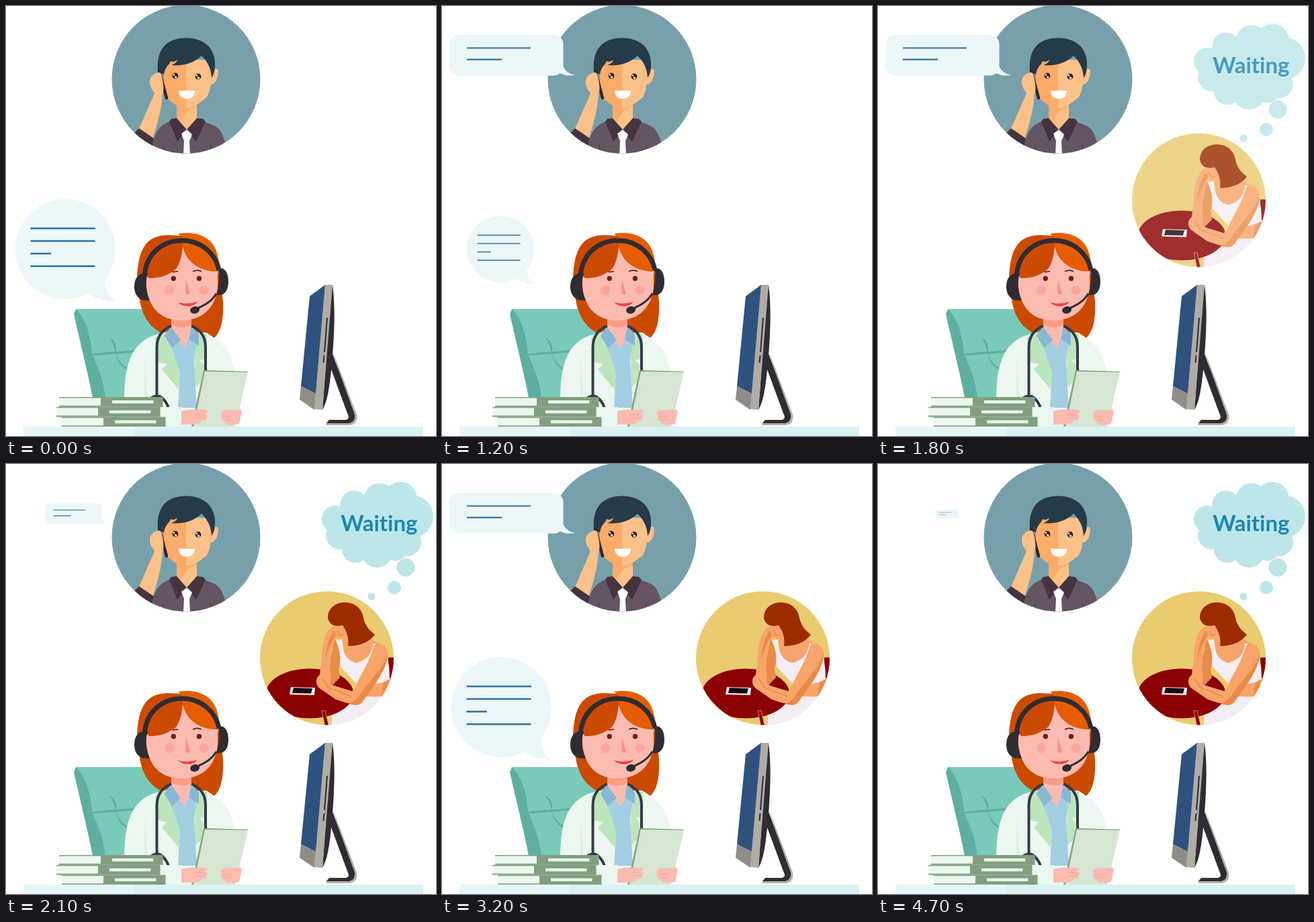
An HTML page for the animation above (4800 ms loop, 640 px wide and 640 px high).

```html
<!DOCTYPE html>
<html lang="en">
<head>
<meta charset="utf-8">
<title>Waiting on a call</title>
<style>
html, body { margin: 0; width: 100%; height: 100%; overflow: hidden; background: #fff; }
svg { display: block; width: 100%; height: 100%; }
text { font: 700 33px Lato, "Open Sans", sans-serif; font-variant-ligatures: none; }
.line { fill: none; stroke: #31719f; }
.dark { fill: #302c33; }
.wire { fill: none; stroke: #302c33; }
.coat { fill: #ebf7ef; }
.pink { fill: #fbbbb1; }
.cover { fill: #819f7f; }
.bubble { fill: #ebf7f9; }
</style>
</head>
<body>
<svg viewBox="0 0 640 640">
<defs>
  <clipPath id="callerClip"><circle cx="268" cy="109" r="110.5"/></clipPath>
  <clipPath id="patientClip"><circle cx="477.5" cy="289" r="99.5"/></clipPath>
</defs>

<g id="caller" clip-path="url(#callerClip)">
  <path fill="#78a0ab" d="M150-10H390V230H150Z"/>
  <path fill="#655462" d="M216 222C219 192 224 180 243 172L256 168H284L305 176C319 181 322 188 328 210V222Z"/>
  <path fill="#fbc188" d="M254 140H284V169L269 185L254 169Z"/>
  <path fill="#fdab68" d="M254 140H284V150C272 152 266 160 259 174L254 169Z"/>
  <path fill="#45343f" d="M246 168L254 167L269 184L255 202L243 172ZM284 167L293 168L297 172L283 202L269 184Z"/>
  <path fill="#fff" d="M269 184L261 190L265 201L264 222H274L273 201L277 191Z"/>
  <path fill="none" stroke="#45343f" stroke-width=".8" d="M233 206L235 216M305 206L303 216"/>
  <path fill="#fbc188" d="M306 97C309 93 316 92 316 97C316 108 311 117 304 117Z"/>
  <path fill="#fbc188" d="M235 80H306V107L303 126L299 136L284 147C276 153 262 153 254 148L240 138L235 122Z"/>
  <path fill="#fdab68" d="M235 80H268V152C261 152 257 150 254 148L240 138L235 122Z"/>
  <path fill="#263b4a" d="M226 98C224 72 232 48 268 47.5C300 48 312 68 311 88C311 97 309 103 306 107C305 92 300 83 291 74C281 84 265 90 246 88C251 86 254 84 255 80C249 85 246 82 245 82L243 86C238 91 236 96 235 102Z"/>
  <g fill="#2a1d15"><circle cx="252" cy="104" r="4.4"/><circle cx="286" cy="105" r="4.4"/></g>
  <g fill="#fff"><circle cx="250" cy="102.5" r="1.3"/><circle cx="252.5" cy="106" r="1.8"/><circle cx="284" cy="103.5" r="1.3"/><circle cx="286.5" cy="107" r="1.8"/>
  <path d="M257 126H281C281 134 276 138 269 138C262 138 257 134 257 126Z"/></g>
  <path fill="none" stroke="#33262f" stroke-width="4.5" stroke-linecap="round" d="M228 96L239 137"/>
  <path fill="#fbc188" d="M229 99C220 99 213 106 214 114C214 121 219 126 221 130L197 185L218 198C225 178 232 152 233 131C236 125 234 112 231 101Z"/>
  <path fill="#45343f" d="M198 182L220 197L217 210L188 192Z"/>
</g>

<g id="patient" clip-path="url(#patientClip)">
  <path fill="#ebcb70" d="M370 180H590V400H370Z"/>
  <path fill="#8b0000" d="M569 288H580V324H568Z"/>
  <path fill="#f4edf3" d="M484 400L486 368L532 346H580V400Z"/>
  <path fill="#f9a46a" d="M499 246H520L553 266L545 300L505 295ZM530 326L574 318V343C560 348 546 346 530 345Z"/>
  <path fill="#e98b47" d="M562 326L574 319V337L558 345Z"/>
  <path fill="#f4edf3" d="M490 263L500 261C500 281 508 294 522 296C536 292 546 282 546 267L557 268C566 278 571 292 571 320C560 326 551 328 543 328H523L498 302Z"/>
  <ellipse cx="452" cy="341.5" rx="65" ry="37" fill="#8b0000"/>
  <path fill="#8b0000" stroke="#f3b9a4" stroke-width=".7" d="M470 367H475L481 392H475Z"/>
  <path fill="#f4edf3" d="M424 332L460 333L459 344L422 343Z"/>
  <path fill="#150a12" d="M428 333L456 334L454 341.5L426 341Z"/>
  <path fill="#e98b47" d="M489 260C497 273 500 291 495 305L497 318L480 335L483 290Z"/>
  <path fill="#f9a46a" d="M484 243C475 252 470 268 470 290C467 310 466 320 468 330L482 334C486 317 481 307 483 290C484 273 488 265 491 258C500 264 507 258 509 250L501 238Z"/>
  <path fill="#e98b47" d="M488 248C481 257 477 271 475 290C480 276 484 264 491 255Z"/>
  <path fill="none" stroke="#e98b47" stroke-width="1.5" d="M493 248L497 255L503 254"/>
  <path fill="#9c2c00" d="M479 229C479 213 492 206 505 206C524 207 531 219 533 233C536 243 543 249 549 254C540 266 525 271 509 271C511 258 506 247 501 240C492 242 482 242 479 229Z"/>
  <path fill="#f9a46a" d="M553 266C564 268 571 278 567 289C561 309 545 331 531 350C525 361 511 358 490 350L467 334C460 328 460 318 468 313C474 322 482 328 492 331L515 338C520 334 521 330 523 325C530 309 542 293 548 270Z"/>
  <path fill="#e98b47" d="M568 282C569 303 548 330 532 352C526 361 519 359 510 357C522 353 527 343 535 332C550 313 562 300 568 282Z"/>
  <path fill="none" stroke="#e98b47" stroke-width="1.5" d="M471 319L480 333L514 346"/>
</g>

<g id="cloud" fill="#bde6e9">
  <ellipse cx="553" cy="88" rx="60" ry="44"/>
  <g id="puffs"></g>
  <text x="555.3" y="100" text-anchor="middle" fill="#1b86b3">Waiting</text>
</g>

<g id="chair">
  <path fill="#79cabb" d="M104 451H238V590H130Z"/>
  <path fill="#5eafa1" d="M104 451L101 459L130 584H148C146 558 135 534 128 518C126 490 119 466 104 451ZM128 518C150 514 175 515 205 510V514C180 516 155 519 128 520ZM153 493C163 498 166 506 163 516C161 506 159 500 153 493ZM163 516C169 532 177 539 190 542C177 544 167 535 163 516Z"/>
</g>

<g id="doctor">
  <path fill="#cc4a00" d="M195 408C196 358 211 341 242 341L262 342C300 342 321 390 323 440C324 464 321 484 310 494L298 486H246L234 488C212 478 203 460 199 438Z"/>
  <path class="coat" d="M236 486C198 493 177 514 176 580V626H341L340 545C335 508 315 494 291 486Z"/>
  <path fill="#dcefe2" d="M207 520L210 582H206Z"/>
  <path fill="#bde5bd" d="M222 494L240 484L262 520L257 571L232 541L240 533L226 530ZM283 490L291 486L299 488V525L288 527L295 535L290 560L279 570Z"/>
  <path fill="#a3cfe2" d="M243 480H279L283 505L280 530L284 598H256L259 545L246 507Z"/>
  <path class="pink" d="M246 460H276V484L267 510L246 486Z"/>
  <path fill="#fc9b86" d="M246 466H276V474C268 481 254 479 246 474Z"/>
  <path fill="#88b8d5" d="M245 477L236 491L247 509L260 497ZM276 477L287 488V506L272 496Z"/>
  <path fill="none" stroke="#343a48" stroke-width="4" d="M246 476C232 482 224.5 492 224.5 508V582M276 476C290 482 297 492 297 508V544M211 590C217 579 228 578 234 585C239 590 241 594 242 600"/>
  <path class="pink" d="M209 398C206 432 218 468 261 468C300 468 314 440 315 416V394C290 395 270 384 263 358H258Z"/>
  <path fill="#cc4a00" d="M263 358C261 380 255 394 245 397C234 404 223 405 213 405C209 402 210 398 204 398C207 365 225 345 263 344Z"/>
  <path fill="#e65d00" d="M256 339C281 334 304 343 312 362C317 375 318 384 317 395C291 396 272 384 263 358V345Z"/>
  <path class="wire" stroke-width="7" d="M206 402C209 366 235 349 262 349C290 349 312 368 317 393"/>
  <path class="dark" d="M211 398C198 396 191 404 191 418C191 432 200 440 214 438C208 425 207 411 211 398ZM316 392C324 387 331 396 331 410C331 424 325 432 313 430C317 418 318 405 316 392Z"/>
  <path class="wire" stroke-width="3" d="M313 428C306 440 296 445 283 451"/>
  <ellipse class="dark" cx="281" cy="452.5" rx="7" ry="5.3" transform="rotate(-12 281 452)"/>
  <path fill="none" stroke="#47201f" stroke-width="1.5" d="M278 395C282 393 287 393 291 395M248 396L256 395"/>
  <g fill="#751d18"><circle cx="249.3" cy="405.5" r="3.7"/><circle cx="287.5" cy="405.5" r="3.7"/></g>
  <g fill="#fca79d"><circle cx="243" cy="423" r="7.2"/><circle cx="294.5" cy="423" r="7.2"/></g>
  <path fill="#f88e88" d="M268 408L274 428C271 431 268 430 267 426Z"/>
  <path fill="#ef4248" d="M256 441C266 444 276 443 285 440C280 448 265 450 256 441Z"/>
  <path class="coat" d="M230 597H262V627H230Z"/>
  <path fill="#85a384" d="M294 542L360 544L359 546H296L281 626H276Z"/>
  <path fill="#d6e6d2" d="M296 544L360 545L341 626H279Z"/>
  <path class="pink" d="M261 603C270 600 283 600 298 601C301 604 299 606 295 607C301 608 301 612 297 613C299 617 294 618 291 617C291 624 279 623 261 623ZM322 603C329 600 340 603 349 600L351 604L347 622C339 624 331 624 326 621C327 617 322 619 321 616C319 613 320 611 322 611C318 608 320 605 322 603Z"/>
  <path fill="none" stroke="#f59c91" stroke-width=".8" d="M281 608H295M283 613H297M322 611H335M325 616H337"/>
</g>

<g id="books"></g>

<path fill="#dbf1f4" d="M26 626H621V640H26Z"/>
<path fill="#e6f6f8" d="M26 626H191V640H26Z"/>

<g id="monitor">
  <path fill="#b3afa7" d="M485 510L522 608C524 619 518 624 510 624H476L478 619H508L516 610Z"/>
  <path class="dark" d="M484 512L519 608C520 617 515 621 508 621H477L481 616H504C511 616 511 612 508 606L480 530Z"/>
  <path class="dark" d="M484 415H486C491 450 488 500 485 530C482 568 478 590 471 601Z"/>
  <path fill="#b0aca4" d="M475 415H486L471 601L459 600Z"/>
  <path fill="#2f517d" d="M452 432L475 415L461 577L439 566Z"/>
  <path fill="#8f8d86" d="M439 566L461 577L459 601L437 586Z"/>
  <path class="wire" stroke-width="2" d="M478 464L474 515M473.5 520L472.5 531"/>
</g>

<g id="round">
  <g class="bubble"><circle cx="88.3" cy="362" r="74.4"/><path d="M148 398C145 418 151 432 162 439.5C145 440 132 435 121 427Z"/></g>
  <path class="line" stroke-width="2.4" d="M36.5 331H133M36.5 349.7H132.5M36.5 368.5H67M36.5 387.3H132.5"/>
</g>

<g id="long">
  <g class="bubble"><rect x="11" y="43" width="169.5" height="60.5" rx="14"/><path d="M180.5 90C184 97 189 101 198 102.5C189 105 179 103 172 98Z"/></g>
  <path class="line" stroke-width="2.2" d="M37 62.5H132M37 79.7H89"/>
</g>
</svg>
<script>
const $ = id => document.getElementById(id);

const puffs = [[490, 82, 20], [497, 106, 21], [518, 60, 20.5], [556, 52, 23.5], [587, 51, 24.5],
  [605, 78, 31], [597, 116, 21], [580, 127, 17], [552, 130, 24], [520, 127, 20],
  [595, 154, 13.5], [578, 184, 10], [544, 197, 5.5]];
$('puffs').innerHTML = puffs.map(([x, y, r]) => `<circle cx="${x}" cy="${y}" r="${r}"/>`).join('');

// Stacked books: page edge on the left, spine with a label on the right
$('books').innerHTML = [79, 75, 83].map((x, i) => {
  const y = 582 + i * 14.8;
  return `<rect class="cover" x="${x}" y="${y}" width="154.5" height="14.8"/>
  <rect class="coat" x="${x}" y="${y + 1.5}" width="62" height="11.3"/>
  <rect class="coat" x="${x + 79}" y="${y + 5}" width="61.5" height="4.5"/>`;
}).join('');

const ramp = (t, a, b) => Math.min(1, Math.max(0, (t - a) / (b - a)));
const zoom = (id, x, y, s) =>
  $(id).setAttribute('transform', `translate(${x} ${y}) scale(${s}) translate(${-x} ${-y})`);
const fade = (id, a) => $(id).setAttribute('opacity', a);

function draw(ms) {
  const t = Math.floor(ms % 4800 / 100) * 100;
  zoom('round', 84.5, 361, 1 - ramp(t, 1100, 1400) + ramp(t, 2100, 2500) - ramp(t, 3700, 4200));
  zoom('long', 104.2, 74.5, ramp(t, 500, 800) - ramp(t, 1900, 2300) + ramp(t, 2900, 3200) - ramp(t, 4300, 4800));
  const shown = ramp(t, 1350, 1900);
  fade('patient', shown);
  fade('cloud', t < 3500 ? shown * (1 - ramp(t, 2200, 3000)) ** 1.5 : ramp(t, 3800, 4400));
}

const start = performance.now();
function tick() {
  draw(performance.now() - start);
  requestAnimationFrame(tick);
}
tick();
</script>
</body>
</html>
```
